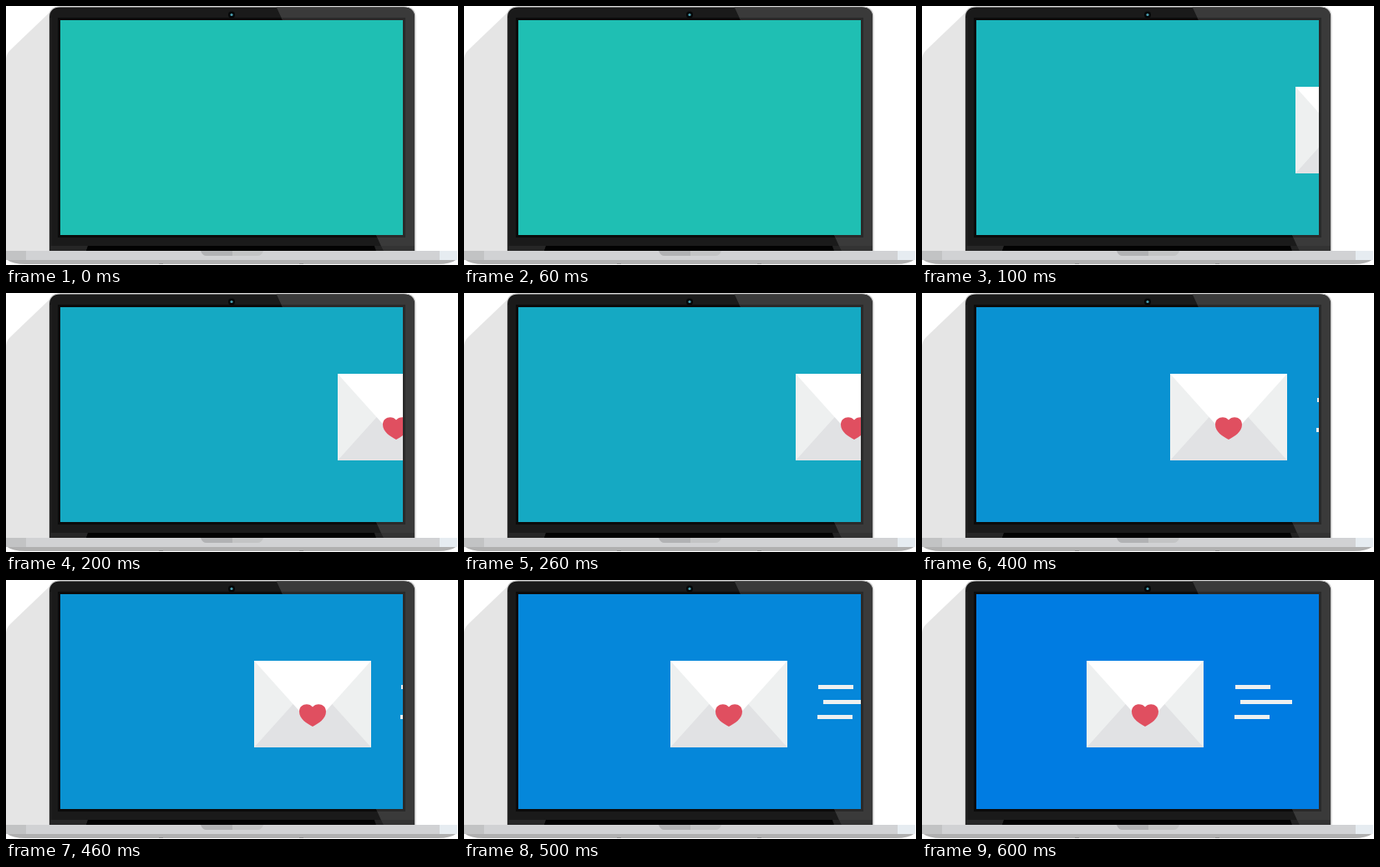
Write an HTML page that moves like this. It is 541 px wide and 311 px high and loops after 0.7 s.

```html
<!DOCTYPE html>
<html lang="en">
<head>
<meta charset="utf-8">
<title>Letter on a laptop</title>
<style>
html, body { margin: 0; width: 100%; height: 100%; overflow: hidden; background: #fff; }
svg { display: block; width: 541px; height: 311px; }
</style>
</head>
<body>
<svg viewBox="0 0 541 311">
  <defs>
    <clipPath id="view"><path d="M65 17h410v258H65z"/></clipPath>
    <clipPath id="lid"><path d="M52 294V14Q52 1.500 65 1.500H476Q489 1.500 489 14V294z"/></clipPath>
  </defs>

  <!-- long shadow -->
  <path fill="#e5e5e5" d="M55 5L5 53Q0 58 0 65V295H55z"/>

  <!-- lid and bezel -->
  <path fill="#cacaca" d="M51 294V14Q51 .3 65 .3H476Q490.500 .3 490.500 14V294z"/>
  <g clip-path="url(#lid)">
    <path fill="#1a1a1a" d="M51 0H491V295H51z"/>
    <path fill="#242424" d="M52 14H54V288H52z"/>
    <path fill="#3a3a3a" d="M323 0H491V295H452L443 275H475V17H331z"/>
    <path fill="#0b0b0b" d="M62 14H329.500L331 17H65V275H443L444.500 278H62z"/>
    <path fill="#2a2a2a" d="M329.500 14H478V278H444.500L443 275H475V17H331z"/>
    <path fill="#262626" d="M52 288H98L96 294H52z"/>
    <path fill="#020202" d="M98 288H441L443 294H96z"/>
    <path fill="#222" d="M441 288H449L452 294H443z"/>
    <path fill="#333" d="M449 288H490V294H452z"/>
  </g>
  <circle cx="270" cy="10.500" r="4" fill="#050708"/>
  <circle cx="270" cy="10.500" r="1.600" fill="#4b9eb0"/>

  <!-- screen -->
  <g clip-path="url(#view)">
    <path id="screen" d="M65 17h410v258H65z"/>
    <g id="letter">
      <path fill="#eef0f0" d="M0 0H140V104H0z"/>
      <path fill="#e1e2e4" d="M0 104L70 26L140 104z"/>
      <path fill="#fff" d="M0 0H140L75 72.500Q70 77 65 72.500z"/>
      <path fill="#e04f60" d="M70 55.500C66 50 54 51 54 61C54 70 63 75 70 79C77 75 86 70 86 61C86 51 74 50 70 55.500z"/>
    </g>
    <path id="trail" fill="#eef0f0" d="M1 126h42v5H1zM7 144h62v5H7zM0 162h42v5H0z"/>
  </g>

  <!-- base -->
  <path fill="#b0b0b0" d="M0 304H540Q532 310 517 310H23Q8 310 0 304z"/>
  <path fill="#d1d2d4" d="M0 294H540V305H0z"/>
  <path fill="#c2c3c4" d="M0 294H24V305H0z"/>
  <path fill="#e6ecf1" d="M519 294H540V305H519z"/>
  <path fill="#b1b2b4" d="M233 294H271V300H240Q235 300 233 294z"/>
  <path fill="#c3c4c5" d="M271 294H308Q306 300 301 300H271z"/>
  <path fill="#8e8e8e" d="M183 309h5v1h-5zM351 309h5v1h-5z"/>
</svg>
<script>
const LOOP = 700, STEP = 100;
const teal = [31, 191, 179], blue = [0, 124, 226];
const el = id => document.getElementById(id);
const screen_ = el('screen'), letter = el('letter'), trail = el('trail');
const start = performance.now();

function draw(now) {
  const time = Math.max(0, now - start) % LOOP;
  const step = Math.floor(time / STEP); // motion is held on each 100 ms step
  const mix = teal.map((c, i) => Math.round(c + (blue[i] - c) * step / 6));
  screen_.setAttribute('fill', `rgb(${mix})`);
  letter.setAttribute('transform', `translate(${497 - 50 * step} 97)`);
  trail.setAttribute('transform', `translate(${668 - 49 * step} 0)`);
  requestAnimationFrame(draw);
}
draw(start);
</script>
</body>
</html>
```
